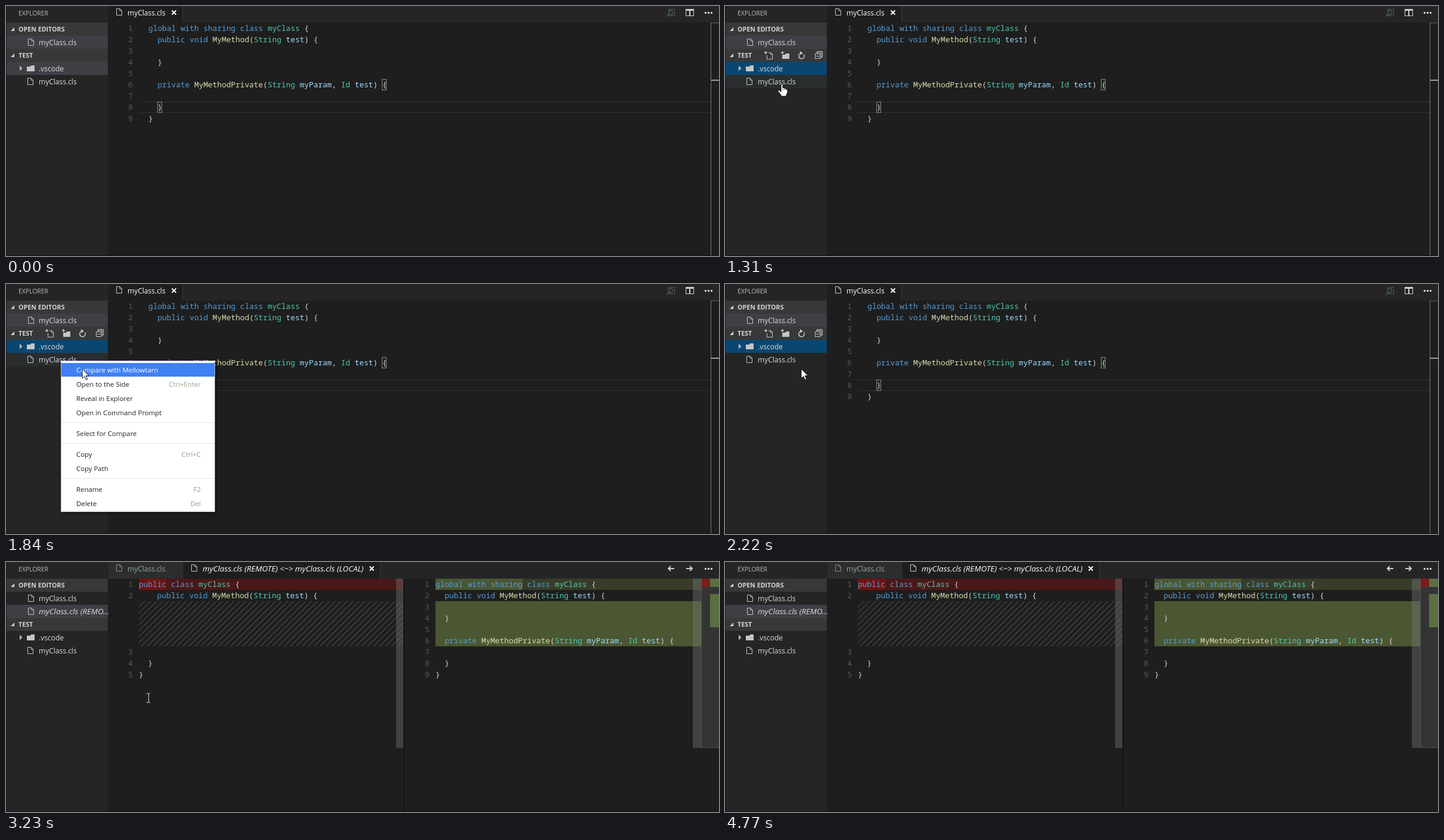
Recreate the animation shown at these times as an HTML page with a canvas. Size 1197 by 421 pixels, loop 4.84 s.

```html
<!DOCTYPE html>
<html lang="en">
<head>
<meta charset="utf-8">
<title>Compare class files</title>
<style>
html, body { margin: 0; width: 100%; height: 100%; overflow: hidden; background: #1e1e1e; }
canvas { display: block; }
</style>
</head>
<body>
<canvas id="stage" width="1197" height="421"></canvas>
<script>
const ctx = document.getElementById('stage').getContext('2d');
const LOOP = 4840, MENU_OPEN = 1380, MENU_CLOSE = 2220, DIFF_OPEN = 2300, DIFF_READY = 2770;
const UI = '"Open Sans", "Noto Sans", sans-serif';
const MONO = '500 12.83px "Noto Sans Mono", "DejaVu Sans Mono", monospace';
const CELL = 7.7, LINE = 19;

// The screen only refreshes at these moments: first, last, count.
const refreshes = [0];
for (const [from, to, n] of [[300, 770, 7], [840, 1310, 7], [1380, 1540, 3], [1680, 1840, 3],
  [2220, 2390, 3], [2770, 2770, 1], [3000, 3470, 7], [3530, 3620, 2]]) {
  for (let i = 0; i < n; i++) refreshes.push(Math.floor((from + (to - from) * i / Math.max(1, n - 1)) / 10) * 10);
}

const pointerPath = [[300, 420, 300], [690, 107, 142], [840, 104, 140], [1310, 94, 131], [1380, 92, 129],
  [1600, 92, 129], [1840, 128, 143], [2940, 128, 143], [3470, 330, 300], [3620, 420, 425]];

const KEYWORDS = 'global with sharing class public private void'.split(' ');
const TYPES = ['myClass', 'String', 'Id'];
const localCode = ['global with sharing class myClass {', '  public void MyMethod(String test) {', '', '  }', '',
  '  private MyMethodPrivate(String myParam, Id test) {', '', '  }', '}'];
const remoteCode = ['public class myClass {', '    public void MyMethod(String test) {', '', '  }', '}'];

function rect(color, x, y, w, h) {
  ctx.fillStyle = color;
  ctx.fillRect(x, y, w, h);
}

function text(str, x, y, color, font, align = 'left') {
  ctx.font = font;
  ctx.fillStyle = color;
  ctx.textAlign = align;
  ctx.fillText(str, x, y);
}

const label = (str, x, y, color = '#dcdcdc', size = 12, style = '') => text(str, x, y, color, `${style} ${size}px ${UI}`);

function shape(points, fill, stroke, width = 1, closed = true) {
  ctx.beginPath();
  points.forEach(([x, y]) => ctx.lineTo(x, y));
  if (closed) ctx.closePath();
  if (fill) { ctx.fillStyle = fill; ctx.fill(); }
  if (stroke) { ctx.strokeStyle = stroke; ctx.lineWidth = width; ctx.stroke(); }
}

const line = (points, color, width = 1) => shape(points, null, color, width, false);

function at(x, y, draw) {
  ctx.save();
  ctx.translate(x, y);
  draw();
  ctx.restore();
}

function outline(color, x, y, w, h) {
  ctx.strokeStyle = color;
  ctx.lineWidth = 1;
  ctx.strokeRect(x + .5, y + .5, w - 1, h - 1);
}

function fileIcon(x, y, color = '#c5c5c5') {
  at(x, y, () => {
    shape([[.5, .5], [6, .5], [9.5, 4], [9.5, 11.5], [.5, 11.5]], null, color);
    line([[6, .5], [6, 4], [9.5, 4]], color);
  });
}

function folderIcon(x, y, color = '#c5c5c5') {
  shape([[0, 2], [6, 2], [7, 0], [13, 0], [13, 10], [0, 10]].map(([a, b]) => [x + a, y + b]), color);
}

function closeIcon(x, y) {
  line([[x - 3.5, y - 3.5], [x + 3.5, y + 3.5]], '#fff', 2);
  line([[x + 3.5, y - 3.5], [x - 3.5, y + 3.5]], '#fff', 2);
}

function header(title, y) {
  rect('#383838', 1, y, 170, 22);
  shape([[14, y + 8], [14, y + 14], [8, y + 14]], '#d0d0d0');
  label(title, 21, y + 15, '#d4d4d4', 10.7, 'bold');
}

function fileRow(y, x = 36, name = 'myClass.cls', style = '', size = 12) {
  fileIcon(x, y + 5);
  label(name, 55, y + 16, '#dcdcdc', size, style);
}

function plus(x, y) {
  line([[x, y + 2.5], [x + 5, y + 2.5]], '#d0d0d0', 1.4);
  line([[x + 2.5, y], [x + 2.5, y + 5]], '#d0d0d0', 1.4);
}

function explorerTools(y) {
  const c = '#c5c5c5';
  plus(66, y + 4);
  line([[73, y + 6.5], [77, y + 6.5], [79.5, y + 9], [79.5, y + 17.5], [70.5, y + 17.5], [70.5, y + 11]], c);
  line([[76.5, y + 7], [76.5, y + 9.5], [79, y + 9.5]], c);
  plus(94, y + 4);
  shape([[96, y + 10], [101, y + 10], [102, y + 8], [108, y + 8], [108, y + 17], [96, y + 17]], c);
  ctx.beginPath();
  ctx.arc(128.5, y + 12, 4.7, -.5, 4.4);
  ctx.strokeStyle = c;
  ctx.lineWidth = 1.7;
  ctx.stroke();
  shape([[126, y + 4], [131, y + 7.5], [126, y + 10.5]], c);
  line([[154.5, y + 7], [154.5, y + 4.5], [163.5, y + 4.5], [163.5, y + 14], [162, y + 14]], c);
  line([[153, y + 6.5], [161.5, y + 6.5], [161.5, y + 16]], c);
  outline(c, 151, y + 8, 9, 9);
  line([[153, y + 12.5], [158, y + 12.5]], c);
}

function sidebar(s) {
  const shift = s.diff ? 22 : 0;
  rect('#252526', 0, 0, 171, 421);
  label('EXPLORER', 21, 16, '#bbbbbb', 10.4);
  header('OPEN EDITORS', 28);
  rect('#3f3f46', 1, 50 + shift, 170, 22);
  fileRow(50, 37);
  if (s.diff) fileRow(72, 37, 'myClass.cls (REMO...', 'italic', 13.3);
  header('TEST', 72 + shift);
  if (s.inSidebar) explorerTools(72 + shift);
  const y = 94 + shift;
  if (!s.diff) {
    rect(s.t >= 1310 ? '#094771' : '#3f3f46', 1, y, 170, 22);
    if (s.menu || (s.inSidebar && s.y >= 116 && s.y < 141 && s.t >= 840)) rect('#2a2d2e', 1, 116, 170, 22);
  }
  shape([[23.5, y + 7.5], [27, y + 11], [23.5, y + 14.5]], '#8a8a8a', '#d0d0d0');
  folderIcon(35, y + 6);
  label('.vscode', 55, y + 15.5);
  fileRow(y + 22);
}

function codeLine(str, x, y) {
  for (const { 0: word, index } of str.matchAll(/\w+|[^\w\s]/g)) {
    const color = KEYWORDS.includes(word) ? '#569cd6' : TYPES.includes(word) ? '#4ec9b0'
      : word.startsWith('MyMethod') ? '#dcdcaa' : /\w/.test(word) ? '#9cdcfe' : '#d4d4d4';
    text(word, x + index * CELL, y, color, MONO);
  }
}

function code(lines, x, gutter, gapAfter = Infinity, gap = 0) {
  lines.forEach((str, i) => {
    const y = 42 + LINE * (i + (i >= gapAfter ? gap : 0));
    text(i + 1, gutter, y, '#5a5a5a', MONO, 'right');
    codeLine(str, x, y);
  });
}

function dots() {
  for (const x of [1173, 1178, 1183]) rect('#d0d0d0', x, 10, 3, 3);
}

function singleEditor(s) {
  rect('#1e1e1e', 172, 0, 124, 28);
  rect('#3a3a3b', 296, 0, 1, 28);
  fileIcon(185, 4);
  label('myClass.cls', 204, 16, '#ffffff');
  closeIcon(282, 11);

  outline('#4f565a', 1112, 5, 11, 12);
  ctx.beginPath();
  ctx.arc(1116, 11, 3.5, 0, 7);
  ctx.fillStyle = '#252526';
  ctx.fill();
  ctx.strokeStyle = '#4a5f6b';
  ctx.lineWidth = 1.3;
  ctx.stroke();
  line([[1113, 14], [1109, 18]], '#4a5f6b', 1.5);
  outline('#d0d0d0', 1141, 5, 14, 12);
  rect('#d0d0d0', 1141, 5, 14, 3);
  rect('#d0d0d0', 1147, 5, 2, 12);
  dots();

  rect('#303030', 224, 161, 959, 1);
  rect('#303030', 224, 179, 959, 1);
  for (const [x, y] of [[631, 123], [254, 161]]) {
    rect('#1b2a1b', x, y, 8, 19);
    outline('#888888', x, y, 8, 19);
  }
  code(localCode, 239, 213);
  if (s.t >= 300 && s.t < 770) rect('#424242', 1184, 28, 13, 285);
  rect('#777777', 1183, 28, 1, 393);
  rect('#606060', 1184, 28, 13, 1);
  rect('#a0a0a0', 1184, 124, 13, 2);
}

function arrowIcon(x, dir) {
  line([[x - 5 * dir, 11], [x + 5 * dir, 11]], '#d0d0d0', 2);
  line([[x + dir, 7], [x + 5 * dir, 11], [x + dir, 15]], '#d0d0d0', 2);
}

function hatch(x, y, w, h) {
  ctx.save();
  ctx.beginPath();
  ctx.rect(x, y, w, h);
  ctx.clip();
  for (let i = x; i < x + w + h; i += 10) line([[i + 2, y - 2], [i - h - 2, y + h + 2]], '#4a4a4a', 1.2);
  ctx.restore();
}

function diffMarks() {
  rect('#4b1818', 223, 28, 444, LINE);
  rect('#6f1313', 223, 28, 46, LINE);
  hatch(223, 66, 444, 76);
  rect('#373d29', 721, 28, 446, LINE);
  rect('#4b5632', 721, 28, 146, LINE);
  rect('#4b5632', 721, 66, 446, 76);
}

function diffEditor(s) {
  rect('#2d2d2d', 172, 0, 125, 28);
  rect('#1e1e1e', 298, 0, 330, 28);
  rect('#3a3a3b', 628, 0, 1, 28);
  fileIcon(185, 4, '#7c9488');
  label('myClass.cls', 204, 16, '#93a99d');
  fileIcon(311, 4);
  label('myClass.cls (REMOTE) <~> myClass.cls (LOCAL)', 330, 16, '#ffffff', 13.4, 'italic');
  closeIcon(614, 11);
  arrowIcon(1117, -1);
  arrowIcon(1147, 1);
  dots();

  const ready = s.t >= DIFF_READY;
  if (ready) diffMarks();
  code(remoteCode, 223, 213, 2, ready ? 4 : 0);
  code(localCode, 721, 711);
  const slider = 'rgba(121,121,121,.4)';
  rect(slider, 655, 28, 12, 285);
  rect('#151515', 667, 28, 2, 393);
  rect(slider, 1153, 28, 14, 285);
  rect('#343434', 1167, 28, 30, 285);
  outline('#555555', 1167, 28, 31, 285);
  if (ready) {
    rect('#7f1b1b', 1168, 28, 14, 14);
    rect('#5b7042', 1182, 28, 15, 14);
    rect('#5b7042', 1182, 54, 15, 56);
  }
}

const menuItems = [['Compare with Mellowtarn', 145], ['Open to the Side', 169, 'Ctrl+Enter'], ['Reveal in Explorer', 193],
  ['Open in Command Prompt', 217], ['Select for Compare', 252], ['Copy', 287, 'Ctrl+C'], ['Copy Path', 311],
  ['Rename', 346, 'F2'], ['Delete', 370, 'Del']];

function contextMenu(s) {
  ctx.save();
  ctx.globalAlpha = Math.min(1, .4 + (s.t - MENU_OPEN) / 160 * .6);
  ctx.shadowColor = 'rgba(0,0,0,.5)';
  ctx.shadowBlur = 4;
  ctx.shadowOffsetX = ctx.shadowOffsetY = 2;
  rect('#ffffff', 92, 129, 259, 255);
  ctx.shadowColor = 'transparent';
  outline('#bababa', 92, 129, 259, 255);
  const hot = s.y >= 133;
  if (hot) rect('#4080f4', 93, 133, 257, 23);
  for (const y of [233, 268, 327]) rect('#e6e6e6', 93, y, 257, 1);
  menuItems.forEach(([name, y, keys], i) => {
    label(name, 118, y + 4, hot && i === 0 ? '#ffffff' : '#222222', 11.4);
    if (keys) text(keys, 327, y + 4, '#8fa283', `11.4px ${UI}`, 'right');
  });
  ctx.restore();
}

function pointer(s) {
  const overRow = s.diff ? s.y >= 116 && s.y < 160 : s.y >= 94 && s.y < 141;
  at(Math.round(s.x), Math.round(s.y), () => {
    ctx.lineJoin = 'round';
    if (!s.menu && !s.inSidebar) {
      line([[-3, -8], [0, -7], [3, -8]], '#d8d8d8');
      line([[.5, -7], [.5, 7]], '#d8d8d8');
      line([[-3, 8], [0, 7], [3, 8]], '#d8d8d8');
    } else if (!s.menu && overRow) {
      shape([[0, 1], [1.5, 0], [3, 1], [3, 7], [5, 6.5], [6, 8], [8, 7.5], [9, 9], [10, 9], [11, 10.5], [11, 15],
        [9, 18], [9, 21], [0, 21], [0, 19], [-5, 12.5], [-4.5, 10.5], [-2.5, 11], [0, 14]], '#fff', '#111');
      for (const x of [3, 6, 8.5]) line([[x, 8], [x, 11]], '#444', .8);
    } else {
      shape([[0, 0], [0, 16], [3.7, 12.6], [6.2, 18.3], [8.7, 17.2], [6.3, 11.6], [11.2, 11.3]], '#fff', '#111');
    }
  });
}

function stateAt(time) {
  const t = refreshes.filter(r => r <= time).pop();
  const s = { t, visible: t >= 300 && t < 3620, diff: t >= DIFF_OPEN, menu: t >= MENU_OPEN && t < MENU_CLOSE, x: 0, y: 0 };
  const next = pointerPath.findIndex(p => p[0] > t);
  if (next > 0) {
    const [a, b] = [pointerPath[next - 1], pointerPath[next]];
    const k = (t - a[0]) / (b[0] - a[0]);
    s.x = a[1] + (b[1] - a[1]) * k;
    s.y = a[2] + (b[2] - a[2]) * k;
  }
  s.inSidebar = s.visible && s.x < 171;
  return s;
}

function frame() {
  const s = stateAt(performance.now() % LOOP);
  rect('#1e1e1e', 0, 0, 1197, 421);
  rect('#252526', 171, 0, 1026, 28);
  sidebar(s);
  (s.diff ? diffEditor : singleEditor)(s);
  rect('#181818', 0, 0, 1, 421);
  rect('#141414', 0, 420, 1197, 1);
  if (s.menu) contextMenu(s);
  if (s.visible) pointer(s);
  requestAnimationFrame(frame);
}
frame();
</script>
</body>
</html>
```
